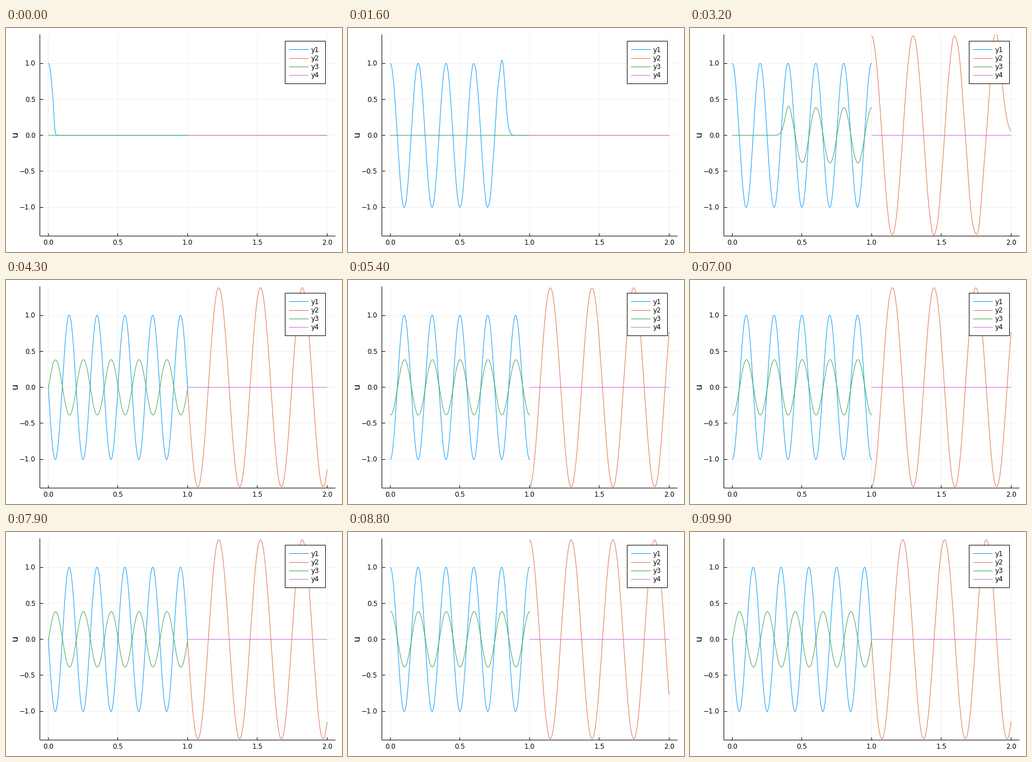
These frames come from a looping animation (600x400 px, 10000 ms). A matplotlib script:

```python
import numpy as np
import matplotlib.pyplot as plt
from matplotlib.animation import FuncAnimation
from matplotlib.patches import Rectangle

W, H, DPI = 600, 400, 100
PX = 72 / DPI                                   # one pixel in points
LEFT, RIGHT, TOP, BOTTOM = 60.6, 588.2, 11.6, 371.7
XLIM, YLIM = (-0.06, 2.06), (-1.4, 1.4)
COLORS = ["#009AFA", "#E36F47", "#3EA44E", "#C371D2"]

FRAMES, STEP = 100, 0.05
SUBSTEPS = 20
NEAR_CELLS, FAR_CELLS = 400, 200
OMEGA = 10 * np.pi
FAR_SPEED = 1.5
REFLECT = (FAR_SPEED ** 2 - 1) / (FAR_SPEED ** 2 + 1)


def feed(t, s):
    """Set the inflow values; each wave runs along its travel direction."""
    incoming, transmitted, reflected = s
    incoming[0] = np.sin(OMEGA * t)
    transmitted[0] = (1 + REFLECT) * incoming[-1]
    reflected[0] = REFLECT * incoming[-1]
    return s


def rate(t, s):
    incoming, transmitted, reflected = feed(t, s)
    return [-np.gradient(incoming, 1 / NEAR_CELLS),
            -FAR_SPEED * np.gradient(transmitted, 1 / FAR_CELLS),
            -np.gradient(reflected, 1 / NEAR_CELLS)]


def shift(s, k, dt):
    return [u + dt * du for u, du in zip(s, k)]


def rk4(t, s, dt):
    a = rate(t, s)
    b = rate(t + dt / 2, shift(s, a, dt / 2))
    c = rate(t + dt / 2, shift(s, b, dt / 2))
    d = rate(t + dt, shift(s, c, dt))
    slope = [(p + 2 * q + 2 * r + z) / 6 for p, q, r, z in zip(a, b, c, d)]
    return feed(t + dt, shift(s, slope, dt))


def simulate():
    dt = STEP / SUBSTEPS
    s = [np.zeros(n + 1) for n in (NEAR_CELLS, FAR_CELLS, NEAR_CELLS)]
    states = []
    for i in range(FRAMES * SUBSTEPS):
        s = rk4(i * dt, s, dt)
        if (i + 1) % SUBSTEPS == 0:
            states.append([u.copy() for u in s])
    return states


plt.rcParams["font.family"] = "DejaVu Sans"
fig = plt.figure(figsize=(W / DPI, H / DPI), dpi=DPI, facecolor="white")


def layer(left, top, right, bottom, xlim, ylim, z):
    ax = fig.add_axes([left / W, 1 - bottom / H, (right - left) / W, (bottom - top) / H],
                      zorder=z)
    ax.set(xlim=xlim, ylim=ylim)
    ax.axis("off")
    return ax


back = layer(0, 0, W, H, (0, W), (H, 0), 1)     # pixel coordinates
plot = layer(LEFT, TOP, RIGHT, BOTTOM, XLIM, YLIM, 2)
page = layer(0, 0, W, H, (0, W), (H, 0), 3)     # pixel coordinates


def to_px(x, y):
    return (LEFT + (x - XLIM[0]) / (XLIM[1] - XLIM[0]) * (RIGHT - LEFT),
            BOTTOM - (y - YLIM[0]) / (YLIM[1] - YLIM[0]) * (BOTTOM - TOP))


def stroke(x0, y0, x1, y1, ax=page, color="black", alpha=1):
    """Draw a crisp line on whole pixels."""
    ax.plot(np.floor([x0, x1]), np.floor([y0, y1]), color=color, alpha=alpha, lw=PX,
            solid_capstyle="butt")


def label(x, y, text, ha):
    page.text(x, y + 4.2, text, fontsize=8.6, ha=ha, va="baseline")


# axes, grid and ticks
stroke(LEFT, TOP, LEFT, BOTTOM)
stroke(LEFT, BOTTOM, RIGHT, BOTTOM)
for v in np.arange(0, 2.1, 0.5):
    x = to_px(v, 0)[0]
    stroke(x, TOP, x, BOTTOM, back, alpha=0.06)
    stroke(x, BOTTOM, x, BOTTOM - 5.5)
    label(x, 382.6, f"{v:.1f}", "center")
for v in np.arange(-1, 1.1, 0.5):
    y = to_px(0, v)[1]
    stroke(LEFT, y, RIGHT, y, back, alpha=0.06)
    stroke(LEFT, y, LEFT + 6, y)
    label(52.6, y, f"{v:.1f}".replace("-", "\u2212"), "right")
page.text(16.6, 189.8, "u", fontsize=11.8, rotation=90, ha="center", va="center")

# legend
page.add_patch(Rectangle((498, 23), 72, 76, fc="white", ec="black", lw=PX))
for i, color in enumerate(COLORS):
    y = 38.9 + 15.12 * i
    stroke(505, y, 540, y, color=color)
    label(545, y, f"y{i + 1}", "left")

# waves
near = np.linspace(0, 1, NEAR_CELLS + 1)
far = 1 + np.linspace(0, 1, FAR_CELLS + 1)
curves = [plot.plot(x, 0 * x, color=c, lw=PX, snap=False, solid_capstyle="butt")[0]
          for x, c in zip([near, far, near, far], COLORS)]
states = simulate()


def draw(n):
    incoming, transmitted, reflected = states[n]
    curves[0].set_ydata(incoming)
    curves[1].set_ydata(transmitted)
    curves[2].set_ydata(reflected[::-1])
    return curves


anim = FuncAnimation(fig, draw, frames=FRAMES, interval=100, repeat=True, repeat_delay=0)
plt.show()
```
